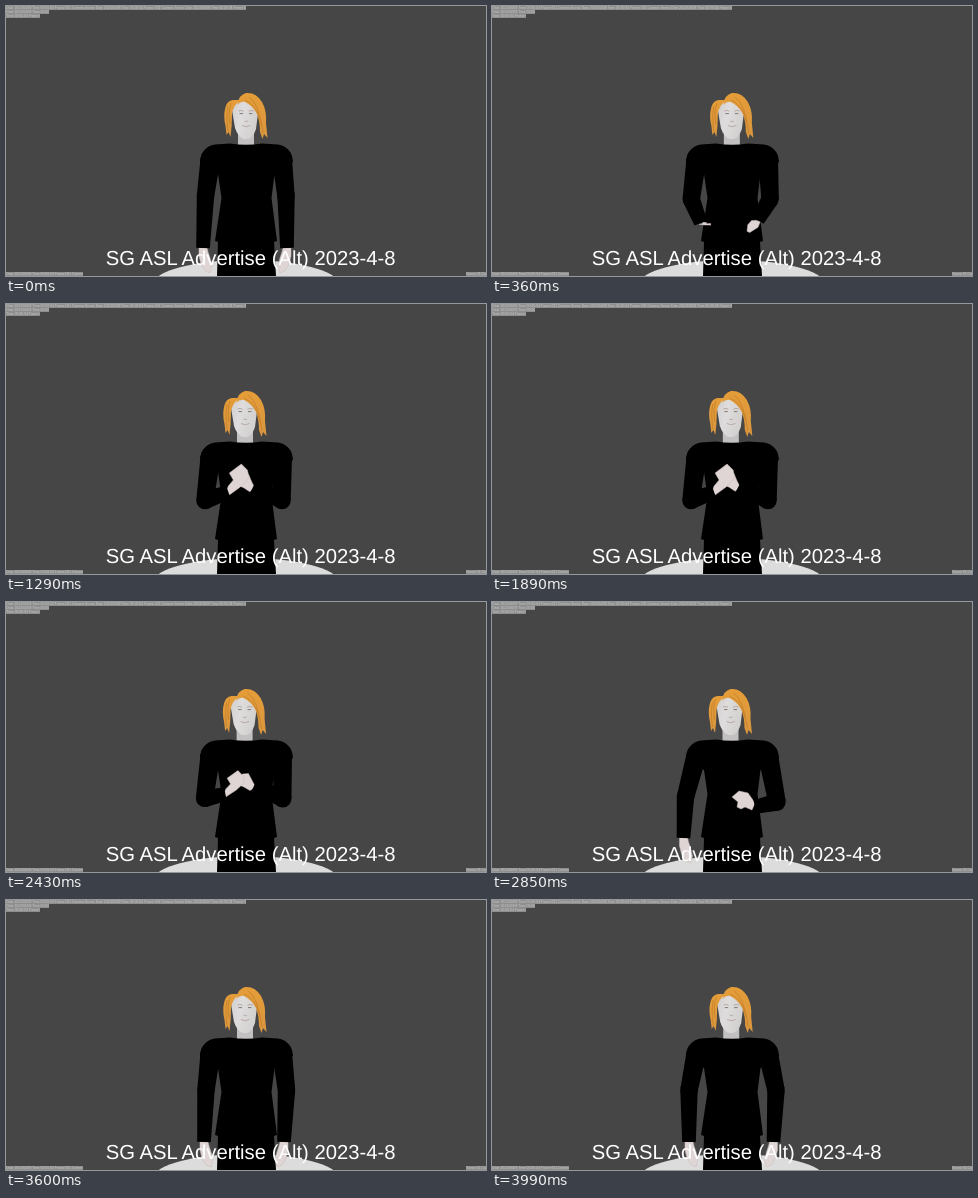
Recreate the animation shown at these times as an HTML page. Size 480 px wide and 270 px high, loop 4050 ms.

```html
<!DOCTYPE html>
<html lang="en">
<head>
<meta charset="utf-8">
<title>Signing figure</title>
<style>
  html, body { margin: 0; width: 100%; height: 100%; overflow: hidden; background: #464646; }
  svg { display: block; width: 100vw; height: 100vh; }
  .caption { font: 20.28px "Liberation Sans", Arial, sans-serif; fill: #fff; text-rendering: geometricPrecision; }
  .tiny { font: 3.4px "Liberation Sans", Arial, sans-serif; fill: #c8c8c8; }
</style>
</head>
<body>
<svg viewBox="0 0 480 270">
  <defs>
    <linearGradient id="skin" x1="0" x2="1" y1="0" y2="0.4">
      <stop offset="0" stop-color="#cfcdcd"/>
      <stop offset="0.45" stop-color="#dedcdc"/>
      <stop offset="1" stop-color="#d3d0d0"/>
    </linearGradient>
    <linearGradient id="hair" x1="0" x2="0" y1="0" y2="1">
      <stop offset="0" stop-color="#e59d38"/>
      <stop offset="1" stop-color="#d9963f"/>
    </linearGradient>
  </defs>
  <rect width="480" height="270" fill="#464646"/>
  <g id="strips"></g>
  <ellipse cx="240" cy="277.5" rx="92" ry="23.5" fill="#dcdcdc"/>

  <g id="head">
    <path d="M232 124 L248 124 L248 140 L232 140Z" fill="#c2c0c0"/>
    <path d="M226 104 Q227 93 239 92 Q252 93 252 107 L250 123 Q247 132 242 133 L238 133 Q232 131 229 122Z" fill="url(#skin)"/>
    <path d="M232.5 105 Q235 103.8 237.5 105.2 M242.5 105.2 Q245 103.8 248 105" fill="none" stroke="#b09c92" stroke-width="0.8"/>
    <path d="M233.5 107.6 H237 M243 107.6 H246.5" stroke="#807a78" stroke-width="1"/>
    <path d="M238.5 115 Q240 116.5 242 115 M236 119.5 Q240 122 244.5 119.5" fill="none" stroke="#b3a5a3" stroke-width="0.9"/>
    <path d="M235 94 Q227 99 226 108 Q226 120 224.5 131 L222.5 126 L220.5 129 L219.5 120 Q217 110 219.5 101 Q221 95 227 94Z" fill="url(#hair)"/>
    <path d="M232 97 Q233 89 240 87 Q250 86 256 96 Q261 105 260 117 L261.5 132 L258 128 L256.5 133 L254 126 Q254 116 251 108 Q247 100 239 96 Q235 95 231 99Z" fill="url(#hair)"/>
    <path d="M222 100 Q220 110 222 125 M225 97 Q222 106 224 118 M243 91 Q253 97 257 127 M239 94 Q251 99 255 117" fill="none" stroke="#c17c28" stroke-width="0.7"/>
  </g>

  <path d="M224 137.5 Q240 140 256 137.5 L272 138.5 Q286 141 287 156 L268.5 168 L265.5 192 L271 235 L268 236 L270 270 L211 270 L212 236 L209 235 L215.5 192 L212 168 L194 156 Q195 141 209 138.5Z"/>
  <g id="arms"></g>
  <text class="caption" x="99.7" y="259">SG ASL Advertise (Alt) 2023-4-8</text>
</svg>
<script>
const LOOP = 4050;
const NS = "http://www.w3.org/2000/svg";
const make = (parent, tag, attrs) => {
  const node = document.createElementNS(NS, tag);
  for (const key in attrs) node.setAttribute(key, attrs[key]);
  return parent.appendChild(node);
};

// Render-info strips: x, y, width, height, text
const note = "Date 2023/04/08 Time 00:00:04 Frame 001 Camera Scene ";
[[0, 0, 240, 4, note.repeat(4)], [0, 4, 43, 4, note.slice(0, 29)],
 [0, 8, 34, 4, note.slice(16, 39)], [0, 266, 77, 4, note],
 [460, 266, 20, 4, "Scene 01 Cam"]].forEach(([x, y, width, height, text]) => {
  const strip = make(document.getElementById("strips"), "svg", { x, y, width, height });
  make(strip, "rect", { width, height, fill: "#8e8e8e" });
  make(strip, "text", { class: "tiny", x: 0.3, y: 3.2 }).textContent = text;
});

// Hand outlines relative to the wrist
const hang = [[4, 0], [4, 8], [2, 16], [-2, 23], [-7, 25], [-9, 18], [-7, 10], [-5, 4], [-4, 0]];
const drop = hang.map(([x, y]) => [-x, y]);
const clasp = [[1, 3], [12, -5], [21, -14], [19, -22], [13, -28], [1, -19], [5, -12], [0, -6], [-3, 2]];
const tuck = [[1, 3], [-4, 6], [-10, 2], [-15, 0], [-15, -5], [-11, -11], [-5, -11], [-2, -4], [0, 0]];
const fist = [[-3, 3], [-10, 0], [-14, 2], [-18, 0], [-17, -5], [-23, -10], [-16, -16], [-7, -14], [0, -4]];

// Each key: time, elbow, wrist, hand outline
const leftKeys = [
  [0, [199.5, 190], [197, 242], drop],
  [90, [199.5, 190], [197, 242], drop],
  [660, [199, 196.5], [222.5, 188], clasp],
  [2340, [199, 196.5], [222, 188], clasp],
  [2850, [193.5, 195], [191.5, 236], drop],
  [3480, [200, 190], [198, 242], drop],
  [3600, [200, 190], [198, 242], drop],
  [3990, [197, 190], [197, 242], drop],
  [LOOP, [199.5, 190], [197, 242], drop]
];
const rightKeys = [
  [0, [280, 190], [281, 242], hang],
  [90, [280, 190], [281, 242], hang],
  [660, [276, 196.5], [248, 182], tuck],
  [2340, [276, 196.5], [247, 181], tuck],
  [2850, [285, 200], [263, 205], fist],
  [3480, [280.5, 190], [278, 242], hang],
  [3600, [280.5, 190], [278, 242], hang],
  [3990, [284, 190], [281.5, 242], hang],
  [LOOP, [280, 190], [281, 242], hang]
];
const headKeys = [[0, 0], [750, -0.3], [1290, -1], [2850, -1.5], [3990, -0.8], [LOOP, 0]];

const mix = (a, b, k) => Array.isArray(a) ? a.map((v, i) => mix(v, b[i], k)) : a + (b - a) * k;
function sample(keys, t) {
  const next = Math.max(1, keys.findIndex(key => key[0] > t));
  const a = keys[next - 1], b = keys[next];
  const k = (t - a[0]) / (b[0] - a[0]);
  return mix(a, b, k * k * (3 - 2 * k));
}

const closed = points => "M" + points.map(p => p.map(v => v.toFixed(2)).join(" ")).join("L") + "Z";
function taper([x1, y1], [x2, y2], r1, r2) {
  const length = Math.hypot(x2 - x1, y2 - y1) || 1;
  const nx = (y1 - y2) / length, ny = (x2 - x1) / length;
  return closed([[x1 + nx * r1, y1 + ny * r1], [x2 + nx * r2, y2 + ny * r2],
                 [x2 - nx * r2, y2 - ny * r2], [x1 - nx * r1, y1 - ny * r1]]);
}

function makeArm(shoulder, keys) {
  const group = make(document.getElementById("arms"), "g", {});
  const hand = make(group, "path", { fill: "#ded5d4", stroke: "#c8bdbb", "stroke-width": 0.5 });
  const upper = make(group, "path", {});
  const lower = make(group, "path", {});
  make(group, "circle", { cx: shoulder[0], cy: shoulder[1], r: 10 });
  const joint = make(group, "circle", { r: 8.7 });
  return t => {
    const [, elbow, wrist, outline] = sample(keys, t);
    upper.setAttribute("d", taper(shoulder, elbow, 10, 8.7));
    lower.setAttribute("d", taper(elbow, wrist, 8.7, 6.8));
    joint.setAttribute("cx", elbow[0]);
    joint.setAttribute("cy", elbow[1]);
    hand.setAttribute("d", closed(outline.map(([x, y]) => [wrist[0] + x, wrist[1] + y])));
  };
}
const poseRight = makeArm([276, 153], rightKeys);
const poseLeft = makeArm([204.5, 153], leftKeys);
const head = document.getElementById("head");

function draw(t) {
  poseLeft(t);
  poseRight(t);
  head.setAttribute("transform", `translate(${sample(headKeys, t)[1]} 0)`);
}
const start = performance.now();
function tick() {
  draw((performance.now() - start) % LOOP);
  requestAnimationFrame(tick);
}
draw(0);
requestAnimationFrame(tick);
</script>
</body>
</html>
```
